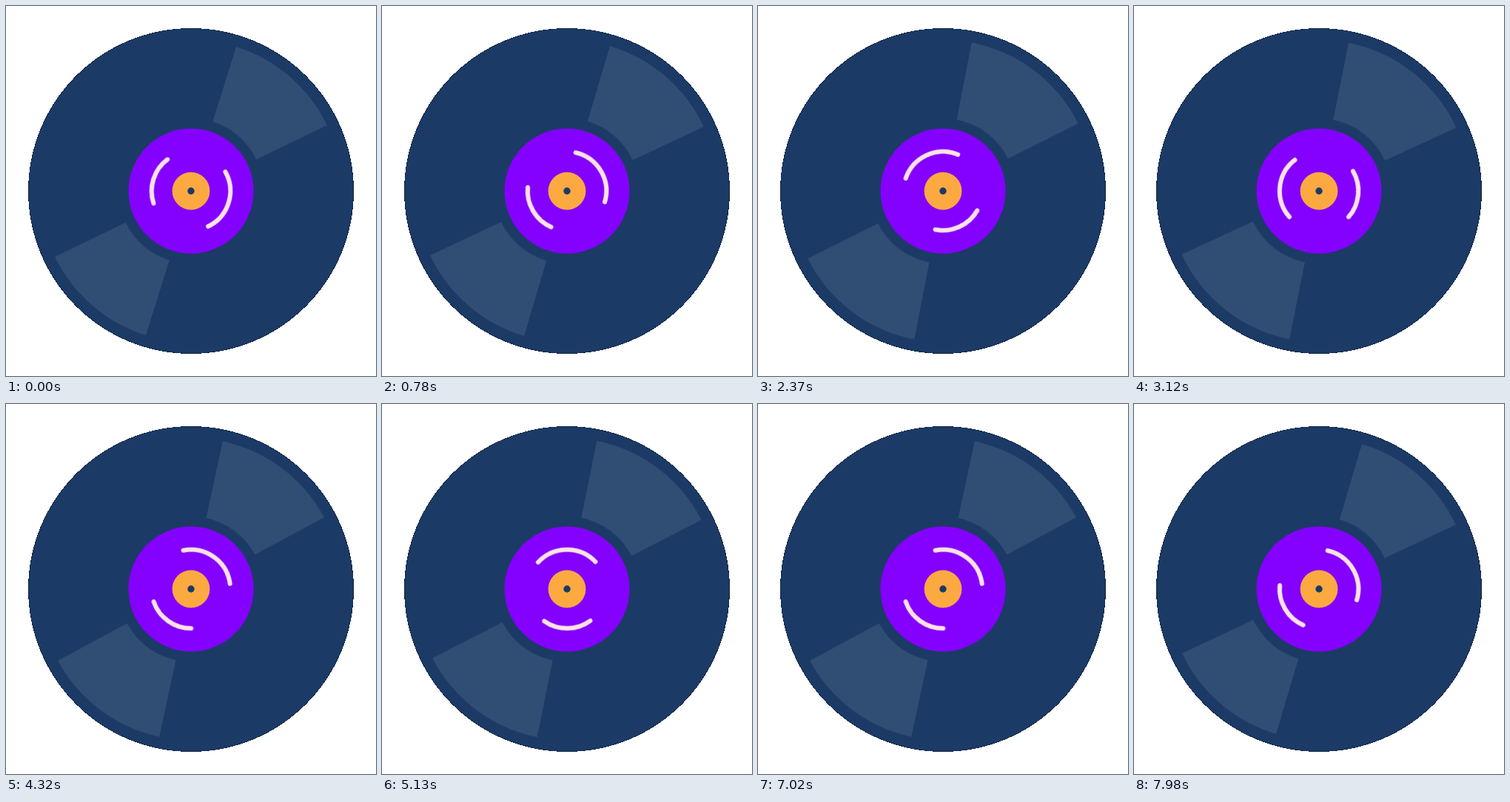
An HTML page for the animation above (8000 ms loop, 500x500 px).

```html
<!DOCTYPE html>
<html lang="en">
<head>
<meta charset="utf-8">
<title>Spinning record</title>
<style>
  html, body { margin: 0; width: 100%; height: 100%; overflow: hidden; background: #fff; }
  svg { display: block; width: 100%; height: 100%; }

  /* The script moves --t; the keyframes supply every pose. */
  .label-arcs, .shine {
    fill: none;
    animation: 900ms linear calc(var(--t, 0) * -1ms) infinite paused;
  }
  .label-arcs {
    stroke: #ffe4e1;
    stroke-width: 6;
    stroke-linecap: round;
    stroke-dasharray: 93.5 97.45 71.6 97.45;
    animation-name: spin;
  }
  .shine {
    stroke: #304e73;
    stroke-width: 106;
    animation-name: sway;
  }

  @keyframes spin {
    from { transform: rotate(-29.25deg); }
    to { transform: rotate(330.75deg); }
  }
  @keyframes sway {
    0% { transform: rotate(-72.6deg); stroke-dasharray: 46.8 133.2; animation-timing-function: ease-in-out; }
    21.667% { transform: rotate(-61.5deg); stroke-dasharray: 50.5 129.5; animation-timing-function: ease-in-out; }
    46.667% { transform: rotate(-78.7deg); stroke-dasharray: 53.9 126.1; }
    60% { transform: rotate(-79.3deg); stroke-dasharray: 53.1 126.9; }
    80% { transform: rotate(-77.9deg); stroke-dasharray: 49.6 130.4; }
    86.667% { transform: rotate(-73.5deg); stroke-dasharray: 48.3 131.7; }
    100% { transform: rotate(-72.6deg); stroke-dasharray: 46.8 133.2; }
  }
</style>
</head>
<body>
<svg viewBox="-250 -250 500 500">
  <circle r="220" fill="#0d1b30" shape-rendering="crispEdges"/>
  <circle r="219.4" fill="#1c3a66"/>
  <circle class="shine" r="151.2" pathLength="360"/>
  <circle r="84.5" fill="#8400ff"/>
  <circle class="label-arcs" r="53.2" pathLength="360"/>
  <circle r="25.4" fill="#fca941"/>
  <circle r="4.7" fill="#1c3a66"/>
</svg>
<script>
  const LOOP = 8000;
  const STEP = 30;
  const root = document.documentElement;

  function tick() {
    const time = performance.now() % LOOP;
    root.style.setProperty('--t', Math.floor(time / STEP) * STEP);
    requestAnimationFrame(tick);
  }
  tick();
</script>
</body>
</html>
```
